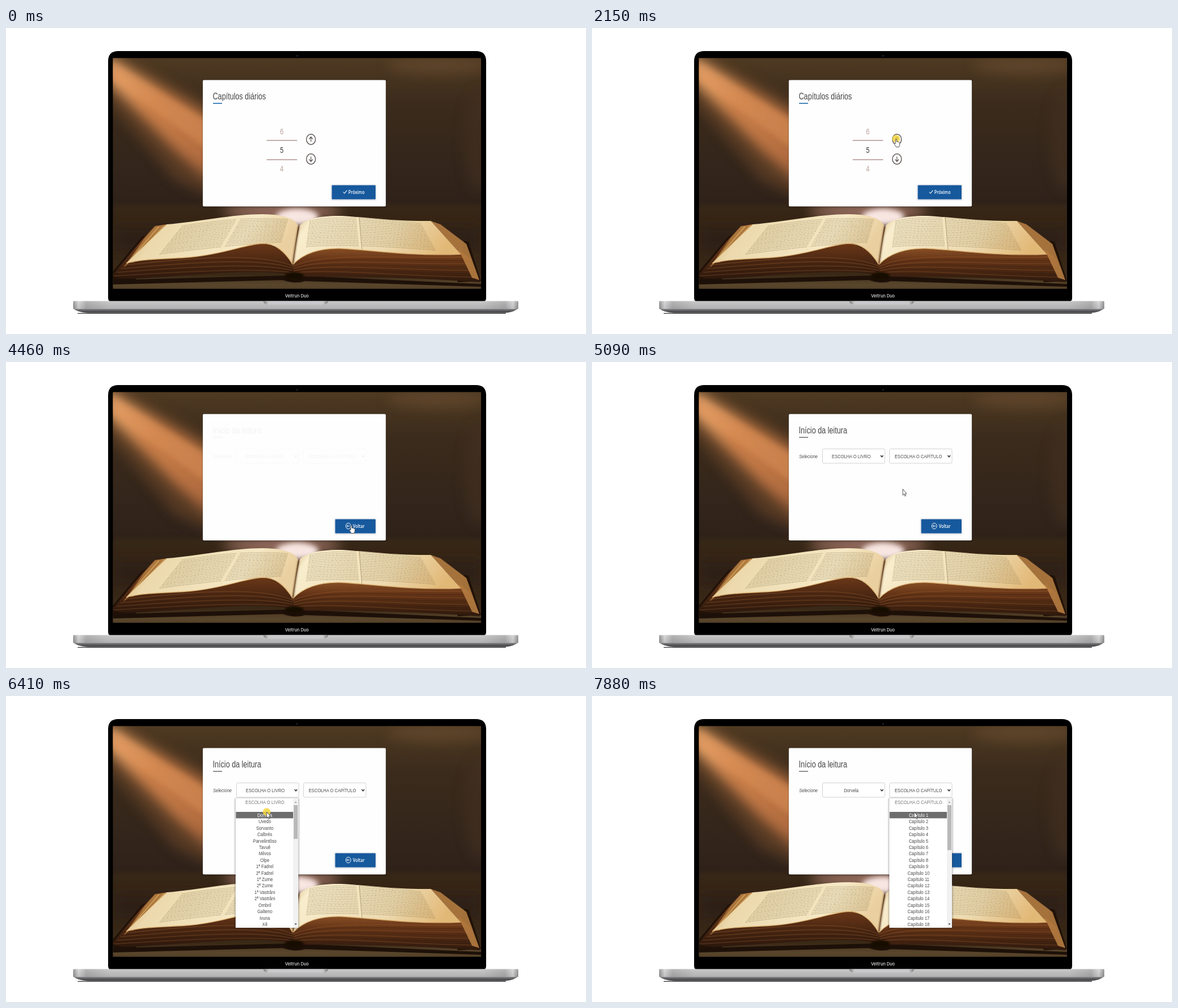
An HTML page that plays this animation: 1028x544 px, repeating every 8 s.

```html
<!DOCTYPE html>
<html lang="pt">
<head>
<meta charset="utf-8">
<title>Leitura diária</title>
<style>
html, body { margin: 0; width: 100%; height: 100%; overflow: hidden; background: #fff; }
svg { display: block; width: 100vw; height: 100vh; }
text { font-family: "Liberation Sans", Arial, sans-serif; }
.btn { font-family: "Open Sans", sans-serif; font-weight: 600; }
.brand { font-family: Inter, sans-serif; font-weight: 500; }
</style>
</head>
<body>
<svg id="stage" viewBox="0 0 1028 544" xmlns="http://www.w3.org/2000/svg"></svg>
<script>
const LOOP = 8000;
const SQUEEZE = 0.8;
const ROW = 11.42;
const $ = id => document.getElementById(id);

const books = ["Dorvela", "Úvedo", "Sorvanto", "Calbrés", "Parvelintôso", "Tavuê", "Milvos", "Olpe",
  "1ª Fadrel", "2ª Fadrel", "1ª Zume", "2ª Zume", "1ª Vastrâni", "2ª Vastrâni", "Ombril", "Galteno", "Ivuna", "Xê"];
const chapters = books.map((_, i) => `Capítulo ${i + 1}`);

function label(x, y, str, size, fill, extra = "") {
  return `<text transform="translate(${x} ${y}) scale(${SQUEEZE} 1)" font-size="${size}" fill="${fill}" ${extra}>${str}</text>`;
}
const centered = (x, y, str, size, fill, extra = "") =>
  label(x, y, str, size, fill, `text-anchor="middle" ${extra}`);

const rect = (x, y, w, h, fill, extra = "") =>
  `<rect x="${x}" y="${y}" width="${w}" height="${h}" fill="${fill}" ${extra}/>`;
const path = (d, fill, extra = "") => `<path d="${d}" fill="${fill}" ${extra}/>`;
const line = (d, stroke, width, extra = "") =>
  path(d, "none", `stroke="${stroke}" stroke-width="${width}" ${extra}`);
const ellipse = (cx, cy, rx, ry, fill, extra = "") =>
  `<ellipse cx="${cx}" cy="${cy}" rx="${rx}" ry="${ry}" fill="${fill}" ${extra}/>`;

function gradient(id, x2, y2, ...stops) {
  const body = stops.map(([at, c]) => `<stop offset="${at}" stop-color="${c}"/>`).join("");
  return `<linearGradient id="${id}" x2="${x2}" y2="${y2}">${body}</linearGradient>`;
}
const blur = (id, sd) =>
  `<filter id="${id}" x="-60%" y="-60%" width="220%" height="220%"><feGaussianBlur stdDeviation="${sd}"/></filter>`;

const leftEdge = "M508 420C495 398 478 383 455 383C425 384 390 401 330 407C290 411 250 409 213 418";
const rightEdge = "M509 420C530 398 560 391 595 392C650 395 720 406 806 402";
const leftPage = leftEdge + "L285 349C340 345 400 331 455 331C490 331 512 338 518 352Q513 385 508 420Z";
const rightPage = rightEdge + "L753 343C690 344 645 337 595 334C560 333 530 339 520 352Q513 385 509 420Z";

function defs() {
  return `<defs>
    ${blur("soft", 11)}${blur("mid", 5)}${blur("fine", 1.6)}
    ${gradient("wall", 0, 1, [0, "#4f3a22"], [.2, "#3b2b1c"], [.62, "#2f221a"], [1, "#3c2b1c"])}
    ${gradient("beam", 1, 1, [0, "#f4b478"], [.35, "#cc8049"], [.75, "#b06b3f"], [1, "#70472d"])}
    ${gradient("paperL", 1, .2, [0, "#d3a866"], [.25, "#ecd9ad"], [.75, "#f6e9c6"], [1, "#ead0a0"])}
    ${gradient("paperR", 1, .2, [0, "#d8b67c"], [.12, "#f8edcd"], [.65, "#eddab0"], [1, "#e2b877"])}
    ${gradient("block", 0, 1, [0, "#93572a"], [.4, "#663517"], [1, "#2c180d"])}
    ${gradient("base", 0, 1, [0, "#d2d2d4"], [.4, "#bcbcbe"], [1, "#a2a2a5"])}
    ${gradient("ends", 1, 0, [0, "#666"], [.012, "#e2e2e2"], [.03, "#999"], [.08, "#c0c0c0"], [.92, "#c0c0c0"], [.97, "#999"], [.988, "#e2e2e2"], [1, "#666"])}
    ${gradient("foot", 0, 1, [0, "#8b8b8e"], [1, "#39393b"])}
    ${gradient("notch", 1, 0, [0, "#777"], [.08, "#c9c9cb"], [.92, "#c9c9cb"], [1, "#777"])}
    <clipPath id="screen"><rect x="189.5" y="53.5" width="652.5" height="410"/></clipPath>
    <clipPath id="pages"><path d="${leftPage}"/><path d="${rightPage}"/></clipPath>
  </defs>`;
}

function printRows() {
  let out = "";
  for (let i = 0; i < 17; i++) {
    const u = i / 16, dash = `stroke-dasharray="${2 + i % 3} .8 1.4 .7" opacity=".42"`;
    out += line(`M${312 - 40 * u} ${352 + 50 * u}Q${430 - 15 * u} ${333 + 50 * u} ${500 - 12 * u} ${341 + 40 * u}`, "#77683f", 1.3, dash);
    out += line(`M${538 - 6 * u} ${343 + 46 * u}Q${590 + 8 * u} ${330 + 52 * u} ${736 + 26 * u} ${348 + 47 * u}`, "#77683f", 1.3, dash);
  }
  return `<g clip-path="url(#pages)">${out}
    ${line("M414 336Q398 365 380 396", "#f3e4bd", 5)}
    ${line("M623 335L629 397", "#f3e4bd", 5)}${line("M626 336L631 396", "#8d7145", .6)}</g>`;
}

function pageEdges() {
  let out = "";
  for (let i = 0; i < 8; i++) {
    const tone = i % 2 ? "#a96a35" : "#32190b";
    out += line(`M${188 + i * 3} ${444 - i * 3.2}C300 ${438 - i * 3.6} 440 ${430 - i * 5} 508 ${437 - i * 2}`, tone, .8, 'opacity=".5"');
    out += line(`M510 ${438 - i * 2}C560 ${432 - i * 5} 700 ${446 - i * 5} ${836 - i * 3} ${449 - i * 6}`, tone, .8, 'opacity=".5"');
  }
  for (let i = 0; i < 5; i++)
    out += line(`M${286 - i * 5} ${350 + i}L${217 - i * 2} ${417 + i * 2}`, i % 2 ? "#e2b774" : "#7b4b22", 1.6);
  return out;
}

function photo() {
  return `<g clip-path="url(#screen)">
    ${rect(189, 53, 654, 411, "url(#wall)")}
    ${ellipse(765, 66, 90, 16, "#6b4d30", 'filter="url(#soft)" opacity=".6"')}
    ${ellipse(840, 200, 28, 90, "#453322", 'filter="url(#soft)" opacity=".6"')}
    ${path("M180 40L390 150L410 320L300 270L180 130Z", "#70492c", 'filter="url(#soft)" opacity=".6"')}
    ${path("M178 50L390 175L400 305L300 218L178 92Z", "url(#beam)", 'filter="url(#soft)"')}
    ${path("M180 56L365 170L365 222L180 84Z", "#de935a", 'filter="url(#mid)" opacity=".45"')}
    ${rect(189, 314, 654, 150, "#3a2919", 'opacity=".7" filter="url(#mid)"')}
    ${rect(189, 350, 654, 50, "#2a1c12", 'opacity=".7" filter="url(#soft)"')}
    ${rect(185, 447, 662, 20, "#59442b", 'filter="url(#mid)"')}
    ${ellipse(490, 326, 105, 12, "#b9877a", 'filter="url(#soft)" opacity=".9"')}
    ${ellipse(516, 336, 38, 15, "#ffeeea", 'filter="url(#mid)" opacity=".95"')}
    ${path("M240 372L262 360L230 448L186 452L190 432Z", "#211208")}
    ${path("M812 378L820 380L842 450L800 452Z", "#211208")}
    ${path("M189 448L500 440L515 434L530 441L842 455L842 460L530 450Q512 456 490 448L189 456Z", "#1d1008")}
    ${path("M285 349L264 352L238 380L188 440Q200 448 240 445L420 433Q490 432 509 442L509 405L455 380Z", "url(#block)")}
    ${path("M509 408L595 385L806 396L822 410L840 452Q760 446 690 444T509 442Z", "url(#block)")}
    ${pageEdges()}
    ${path("M753 343L770 349L816 384L839 448L826 444L806 402Z", "#ba8143", 'opacity=".85"')}
    ${path("M285 349L264 353L246 373L214 418L226 417Z", "#c9944f", 'opacity=".6"')}
    ${path(leftPage, "url(#paperL)")}${path(rightPage, "url(#paperR)")}
    ${printRows()}
    ${line("M519 352Q513 385 508 424", "#6b4220", 2.4, 'filter="url(#fine)"')}
    ${line(leftEdge, "#dcb272", 1.4)}${line(rightEdge, "#dcb272", 1.4)}
    ${ellipse(511, 441, 17, 7, "#140b06", 'filter="url(#fine)"')}
  </g>`;
}

function laptop() {
  return path("M181 480V59Q181 41 199 41H833Q851 41 851 59V480Q851 487 844 487H188Q181 487 181 480Z", "#000") +
    ellipse(516, 49.5, 1.6, 1.6, "#20242a") + photo() +
    `<text class="brand" x="515.5" y="479" font-size="7.5" fill="#e4e4e4" text-anchor="middle">Veltrun Duo</text>` +
    path("M119 498H908Q902 505 884 506.5H145Q125 505 119 498Z", "url(#foot)") +
    rect(119, 485.5, 789, 14, "url(#base)", 'rx="1.5"') +
    rect(119, 485.5, 789, 14, "url(#ends)", 'rx="1.5" opacity=".5"') +
    path("M456 485.5H571Q570 491.5 563 491.5H464Q457 491.5 456 485.5Z", "url(#notch)") +
    line("M127 507.3H886", "#000", 1);
}

function arrowButton(cy, dir) {
  const tip = cy - 4.5 * dir, wing = tip + 4 * dir;
  return ellipse(540.5, cy, 8, 9.3, "#fff", 'stroke="#5b5452" stroke-width="1.4"') +
    line(`M540.5 ${cy + 4.5}V${cy - 4.5}M537.2 ${wing}L540.5 ${tip}L543.8 ${wing}`, "#5b5452", 1.2);
}

function button(x, inner) {
  return rect(x - 1, 279, 657 - x, 27, "#6f7f95", 'filter="url(#fine)" opacity=".35"') +
    rect(x, 279.5, 655 - x, 25, "#17599d", 'rx="1"') + inner;
}

const heading = (str, bar) => label(366.5, 126.8, str, 15.8, "#444") + rect(367, 133, 16, 1.9, bar);

function counterPage() {
  const digit = (id, y, fill) => centered(488.8, y, "", 13.8, fill, `id="${id}"`);
  return `<g id="counter">${heading("Capítulos diários", "#3d80b8")}
    ${digit("next", 188.7, "#b39c98")}${digit("now", 222, "#333")}${digit("prev", 255.3, "#b39c98")}
    ${rect(462, 199, 54, 1.6, "#b79b95")}${rect(462, 233.4, 54, 1.6, "#b79b95")}
    ${arrowButton(198, 1)}${arrowButton(233, -1)}</g>
    <g id="go">${button(577.5, line("M597.7 291.5L600 294L604.2 288.6", "#fff", 1.1) +
      label(606.8, 295, "Próximo", 9, "#fff", 'class="btn"'))}</g>`;
}

function select(x, id, str) {
  return rect(x, 154.5, 110.5, 25.5, "#fff", 'rx="2" stroke="#d3d3d3"') +
    centered(x + 51, 170.7, str, 9.5, "#4c4c4c", `id="${id}"`) +
    line(`M${x + 103} 166l2.3 2.8l2.3 -2.8`, "#333", 1.5);
}

function startPage() {
  return `<g id="start">${heading("Início da leitura", "#8a8a8a")}
    ${label(367, 170.7, "Selecione", 9.4, "#4c4c4c", 'font-style="italic"')}
    ${select(408.5, "book", "ESCOLHA O LIVRO")}${select(527.5, "chapter", "ESCOLHA O CAPÍTULO")}</g>
    <g id="back">${button(583.5, ellipse(606.7, 291.6, 4.4, 5.2, "none", 'stroke="#fff"') +
      line("M609.2 291.6H604.4M606.3 289.3L604.2 291.6L606.3 293.9", "#fff", .9) +
      label(614.8, 295, "Voltar", 9, "#fff", 'class="btn"'))}</g>`;
}

function menu(id, x, title, items, thumb) {
  const mid = x + 51.7;
  const rows = items.map((s, i) =>
    centered(mid, 192 + ROW * (i + 2), s, 9.5, "#484848", i ? "" : `id="${id}First"`)).join("");
  return `<g id="${id}">
    ${rect(x, 183, 111, 229, "none", 'stroke="#333" stroke-width="2" opacity=".5" filter="url(#fine)"')}
    ${rect(x, 182, 111, 230, "#fff", `id="${id}Box"`)}
    <g id="${id}Rows">
      ${rect(x + .5, 183, 101.5, 11.5, "#bdbdbd", `id="${id}Head"`)}
      ${rect(x + .5, 206, 101.5, 11.4, "#6d6d6d", `id="${id}Hover"`)}
      ${centered(mid, 192, title, 9.5, "#fff", `id="${id}Title"`)}${rows}
      ${rect(x + 102, 183, 9, 229, "#f1f1f1")}${rect(x + 103, 194, 7, thumb, "#b9b9b9")}
      ${path(`M${x + 104.5} 190h4l-2 -2.6Z`, "#999")}${path(`M${x + 104.5} 404.5h4l-2 2.6Z`, "#333")}
    </g></g>`;
}

function cursor() {
  const pen = 'stroke="#444" stroke-width=".9" stroke-linejoin="round"';
  return `<g id="cursor"><circle id="click" r="6.8" fill="#f4d63c" opacity=".85"/>
    ${path("M0 0V11L2.3 8.9L3.8 12.6L5.4 12L3.9 8.3H6.8Z", "#fff", `id="arrow" ${pen}`)}
    ${path("M-1 1Q0 -.6 1.1 1V5.2Q2.4 4.4 3 5.6Q4.2 4.9 4.8 6.2Q6.4 5.8 6.4 7.4V11L5 14.5H0L-3.2 9.2Q-3 7.4 -1 8.6Z", "#fff", `id="hand" ${pen}`)}
  </g>`;
}

$("stage").innerHTML = defs() + laptop() +
  rect(349, 93, 324, 225, "#000", 'filter="url(#fine)" opacity=".45"') +
  rect(348.8, 92.5, 324.4, 224.8, "#fefefe", 'rx="2"') +
  counterPage() + startPage() +
  menu("menuA", 407, "ESCOLHA O LIVRO", books, 60) +
  menu("menuB", 527, "ESCOLHA O CAPÍTULO", chapters, 80) + cursor();

// pointer path: time, x, y
const track = [
  [760, 717, 378], [1250, 597, 338], [1530, 546, 285], [1950, 539, 197], [3010, 539, 197],
  [3290, 600, 259], [3540, 628, 352], [3790, 640, 325], [4119, 640, 325], [4120, 612, 290],
  [4600, 612, 290], [5090, 551, 226], [5440, 508, 165], [5720, 508, 165], [6100, 462, 206],
  [6540, 462, 206], [7140, 571, 180], [7540, 571, 180], [7740, 571, 206], [LOOP, 571, 206]
];
const clicks = [[2140, 2210], [2540, 2680], [4320, 4390], [5440, 5580], [6410, 6540], [7210, 7280]];
const hands = [[1880, 3080], [4120, 4670]];

const within = (t, spans) => spans.some(([a, b]) => t >= a && t < b);
const clamp = v => Math.max(0, Math.min(1, v));
const show = (id, on) => $(id).setAttribute("visibility", on ? "inherit" : "hidden");
const fade = (id, v) => $(id).setAttribute("opacity", v);
const paint = (id, color) => $(id).setAttribute("fill", color);
const write = (id, s) => { if ($(id).textContent !== String(s)) $(id).textContent = s; };

function pointerAt(t) {
  const i = Math.max(1, track.findIndex(k => k[0] >= t));
  const [t0, x0, y0] = track[i - 1], [t1, x1, y1] = track[i];
  const u = clamp((t - t0) / (t1 - t0));
  return [x0 + (x1 - x0) * u, y0 + (y1 - y0) * u];
}

function updateMenu(id, t, opens, hover, closes) {
  const full = t >= opens + 70, over = t >= hover;
  show(id, t >= opens && t < closes);
  show(id + "Rows", full);
  fade(id, full ? 1 : .45);
  $(id + "Box").setAttribute("fill-opacity", full ? 1 : .08);
  fade(id + "Head", over ? 0 : 1);
  fade(id + "Hover", over ? 1 : 0);
  paint(id + "Title", over ? "#777" : "#fff");
  paint(id + "First", over ? "#fff" : "#484848");
}

function draw(t) {
  const n = t < 2210 ? 5 : t < 2610 ? 6 : 7;
  write("now", n); write("next", n + 1); write("prev", n - 1);
  for (const id of ["next", "prev"]) paint(id, n > 5 ? "#a3a3a3" : "#b99f9a");

  fade("counter", clamp((4400 - t) / 80));
  fade("start", clamp((t - 4440) / 350));
  show("go", t < 4390);
  show("back", t >= 4390);
  write("book", t < 6540 ? "ESCOLHA O LIVRO" : books[0]);
  updateMenu("menuA", t, 5510, 6060, 6540);
  updateMenu("menuB", t, 7210, 7740, LOOP);

  const [x, y] = pointerAt(t);
  const hand = within(t, hands);
  $("cursor").setAttribute("transform", `translate(${x} ${y})`);
  show("cursor", t >= 760);
  show("hand", hand);
  show("arrow", !hand);
  show("click", within(t, clicks));
}

const began = performance.now();
function tick() {
  draw((performance.now() - began) % LOOP);
  requestAnimationFrame(tick);
}
tick();
</script>
</body>
</html>
```
